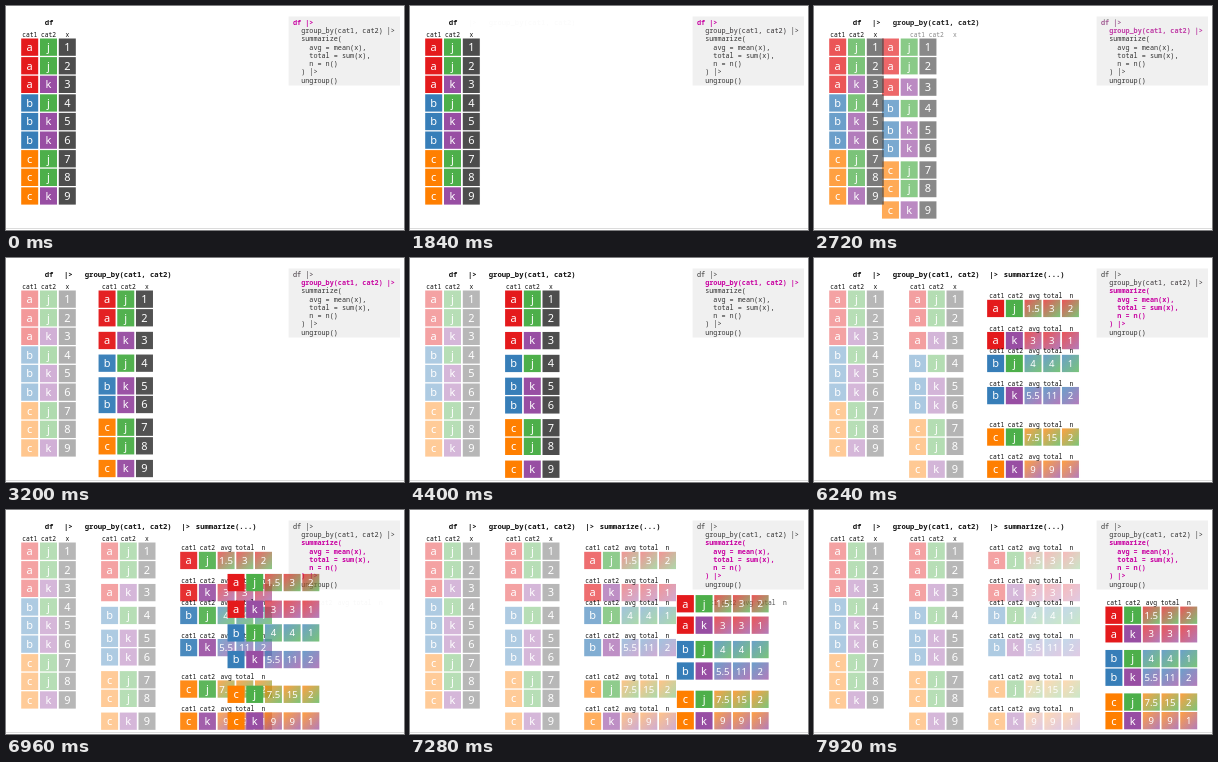
Recreate the animation shown at these times as an HTML page. Size 398 by 224 pixels, loop 8 s.

```html
<!DOCTYPE html>
<html lang="en">
<head>
<meta charset="utf-8">
<title>Grouped summary</title>
<style>
  html, body { margin: 0; width: 100%; height: 100%; overflow: hidden; background: #fff; }
  svg { display: block; width: 100vw; height: 100vh; }
  text { font-family: "Noto Sans Mono", "DejaVu Sans Mono", monospace; fill: #111; white-space: pre; }
  .title { font-size: 7.25px; font-weight: 700; }
  .label { font-size: 6.3px; text-anchor: middle; }
  .code { font-size: 6.8px; fill: #333; }
  .hot { font-weight: 700; fill: #c800a1; }
  .cell { font-family: "Noto Sans", "Open Sans", sans-serif; font-size: 11px; fill: #fff; text-anchor: middle; }
  .num { font-size: 9.6px; }
</style>
</head>
<body>
<svg id="stage" viewBox="0 0 398 224"></svg>
<script>
const NS = "http://www.w3.org/2000/svg";
const stage = document.getElementById("stage");
const LOOP = 8000, MOVE = 2000;
const START = { group: 1600, sum: 4540, join: 6030 };
const COLORS = { a: "#e41a1c", b: "#377eb8", c: "#ff7f00", j: "#4daf4a", k: "#984ea3" };
const DARK = "#4d4d4d";
const SOFT = 0.74;
const ROWS = ["aj", "aj", "ak", "bj", "bk", "bk", "cj", "cj", "ck"];
const SUMS = [
  ["aj", "1.5", 3, 2], ["ak", 3, 3, 1], ["bj", 4, 4, 1],
  ["bk", 5.5, 11, 2], ["cj", 7.5, 15, 2], ["ck", 9, 9, 1]
];

function add(parent, tag, attrs = {}, content) {
  const el = document.createElementNS(NS, tag);
  for (const key in attrs) el.setAttribute(key, attrs[key]);
  if (content !== undefined) el.textContent = content;
  parent.appendChild(el);
  return el;
}
const layer = () => add(stage, "g");
const text = (parent, cls, x, y, s) => add(parent, "text", { class: cls, x, y }, s);
const fade = (el, a) => el.setAttribute("opacity", a.toFixed(3));
const mix = (a, b, p) => a + (b - a) * p;
const clamp = v => Math.max(0, Math.min(1, v));
const ease = u => u < 0.5 ? 4 * u ** 3 : 1 - 4 * (1 - u) ** 3;
const progress = (t, start) => ease(clamp((t - start) / MOVE));
const dim = p => 1 - 0.6 * p * p;

function cell(parent, fill, s, cls = "cell") {
  const g = add(parent, "g");
  add(g, "rect", { x: -8.5, y: -8.7, width: 17, height: 17.3, fill });
  text(g, cls, 0, cls === "cell" ? 3.8 : 3.5, s);
  return g;
}
function place(g, x, y) {
  g.setAttribute("transform", `translate(${x.toFixed(2)} ${y.toFixed(2)})`);
}
function labels(parent, x, y, names, pitch) {
  names.forEach((s, i) => text(parent, "label", x + i * pitch, y, s));
}

// Layout
const dfX = c => 23.7 + 18.8 * c;
const groupX = c => 103.6 + 18.7 * c;
const sumX = c => 182.7 + 18.7 * c;
const joinX = c => 300 + 18.7 * c;
const groupOf = i => SUMS.findIndex(s => s[0] === ROWS[i]);
const dfY = i => 41.2 + 18.6 * i;
const groupY = i => dfY(i) + 4.25 * groupOf(i);
const sumY = k => {
  const ys = ROWS.map((r, i) => i).filter(i => groupOf(i) === k).map(groupY);
  return ys.reduce((a, b) => a + b) / ys.length;
};
const joinY = k => 105.3 + 18.6 * k + 6.2 * Math.floor(k / 2);

const defs = add(stage, "defs");
for (const [key] of SUMS) {
  const grad = add(defs, "linearGradient", { id: key, x1: 0, y1: 0, x2: 1, y2: 1 });
  [...key].forEach((ch, i) => add(grad, "stop", { offset: i, "stop-color": COLORS[ch] }));
}

add(stage, "rect", { width: 398, height: 224, fill: "#fff" });
add(stage, "rect", { y: 222, width: 398, height: 1, fill: "#dcdcdc" });
add(stage, "rect", { x: 282.6, y: 10.5, width: 111.4, height: 69, fill: "#f0f0f0" });

// Code panel: indent, step, text
const code = [
  [0, 0, "df |>"], [2, 1, "group_by(cat1, cat2) |>"], [2, 2, "summarize("],
  [4, 2, "avg = mean(x),"], [4, 2, "total = sum(x),"], [4, 2, "n = n()"],
  [2, 2, ") |>"], [2, 3, "ungroup()"]
].map(([indent, step, s], i) => {
  const x = 287 + indent * 4.08, y = 18.7 + i * 8.28;
  return { step, plain: text(stage, "code", x, y, s), hot: text(stage, "code hot", x, y, s) };
});

// Tables, back to front
const names = ["cat1", "cat2", "x"], sumNames = ["cat1", "cat2", "avg", "total", "n"];
const sumLayer = layer(), groupLayer = layer(), dfLayer = layer();

const rowCells = (parent, i) => [
  ...[...ROWS[i]].map(ch => cell(parent, COLORS[ch], ch)),
  cell(parent, DARK, i + 1)
];
const sumCells = (parent, [key, ...nums]) => [
  ...[...key].map(ch => cell(parent, COLORS[ch], ch)),
  ...nums.map(n => {
    const g = cell(parent, `url(#${key})`, n, "cell num");
    fade(g.firstChild, SOFT);
    return g;
  })
];

const merging = ROWS.map((r, i) => rowCells(sumLayer, i));
const sums = SUMS.map(s => sumCells(sumLayer, s));
const grouped = ROWS.map((r, i) => rowCells(groupLayer, i));
ROWS.forEach((r, i) => rowCells(dfLayer, i).forEach((g, c) => place(g, dfX(c), dfY(i))));

const dfText = layer(), groupTitle = layer(), sumTitle = layer();
const groupLabels = layer(), sumLabels = layer(), joinLabels = layer(), joinLayer = layer();
text(dfText, "title", 38.7, 18.7, "df");
labels(dfText, dfX(0), 30.6, names, 18.8);
text(groupTitle, "title", 58, 18.7, "|>");
text(groupTitle, "title", 78.7, 18.7, "group_by(cat1, cat2)");
text(sumTitle, "title", 175.3, 18.7, "|>");
text(sumTitle, "title", 189.8, 18.7, "summarize(...)");
labels(groupLabels, groupX(0), 30.6, names, 18.7);
SUMS.forEach((s, k) => labels(sumLabels, sumX(0), sumY(k) - 10.1, sumNames, 18.7));
labels(joinLabels, joinX(0), joinY(0) - 10.1, sumNames, 18.7);

const joined = SUMS.map(s => sumCells(joinLayer, s));

function draw(t) {
  const g = progress(t, START.group), s = progress(t, START.sum), j = progress(t, START.join);
  const heat = [1 - g, g * (1 - s), s, 0];
  for (const line of code) {
    fade(line.plain, 1 - heat[line.step]);
    fade(line.hot, heat[line.step]);
  }

  // Titles come in early, column labels late.
  fade(groupTitle, clamp(1.4 * g));
  fade(sumTitle, clamp(1.4 * s));
  [[groupLabels, g], [sumLabels, s], [joinLabels, j]].forEach(([el, p]) =>
    fade(el, clamp(1.8 * p - 0.7)));

  fade(dfLayer, dim(g));
  fade(groupLayer, g * dim(s));
  grouped.forEach((row, i) => row.forEach((el, c) =>
    place(el, mix(dfX(c), groupX(c), g), mix(dfY(i), groupY(i), g))));

  // Rows of one group slide together, then turn into summary values.
  const reveal = clamp((s - 0.5) / 0.45);
  fade(sumLayer, dim(j));
  merging.forEach((row, i) => row.forEach((el, c) => {
    place(el, mix(groupX(c), sumX(c), s), mix(groupY(i), sumY(groupOf(i)), s));
    fade(el, s * (1 - reveal));
  }));
  sums.forEach((row, k) => row.forEach((el, c) => {
    place(el, mix(groupX(c), sumX(c), s), sumY(k));
    fade(el, reveal);
  }));

  fade(joinLayer, clamp(2.5 * j));
  joined.forEach((row, k) => row.forEach((el, c) =>
    place(el, mix(sumX(c), joinX(c), j), mix(sumY(k), joinY(k), j))));
}

const begin = performance.now();
function tick() {
  draw((performance.now() - begin) % LOOP);
  requestAnimationFrame(tick);
}
tick();
</script>
</body>
</html>
```
